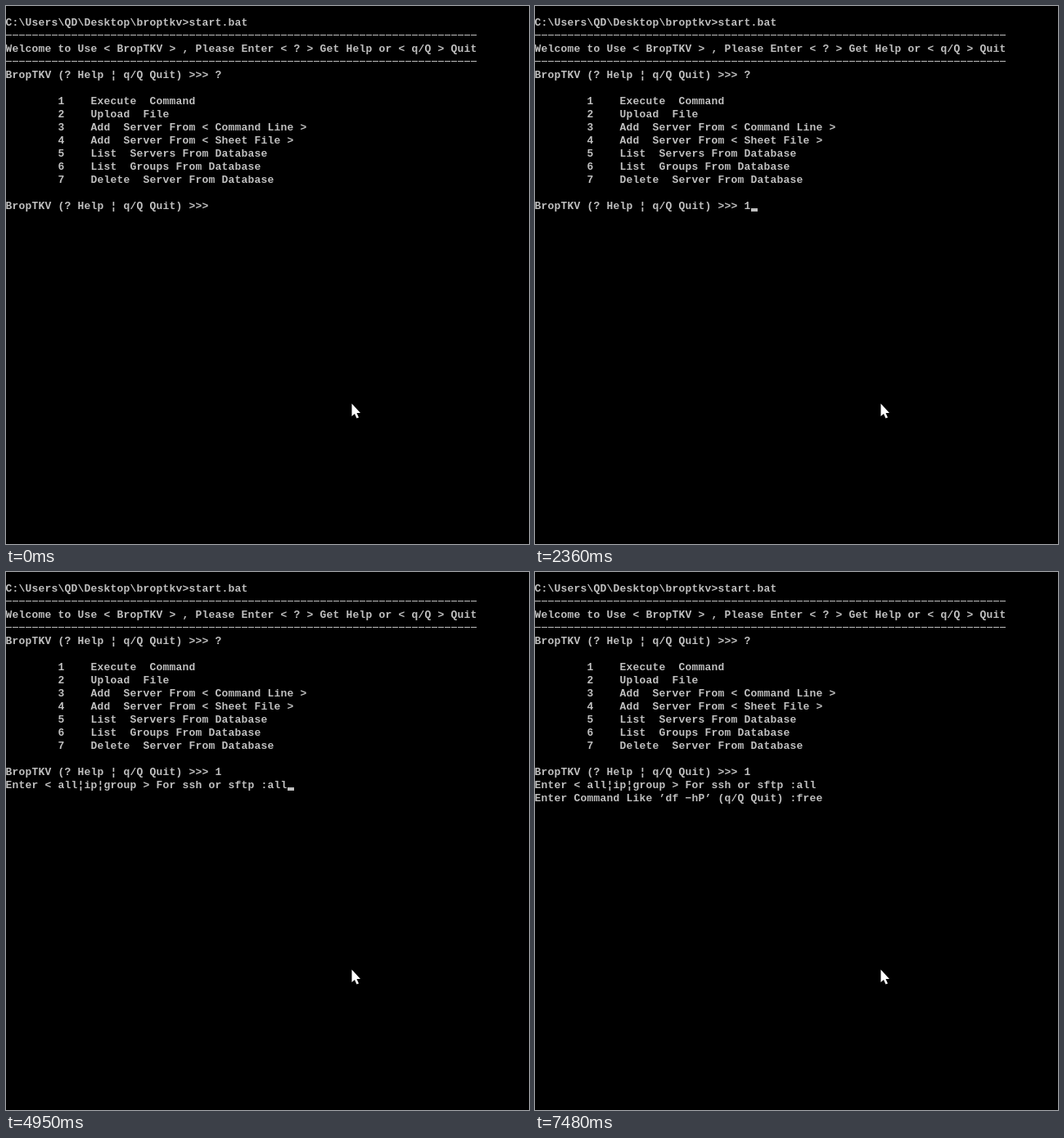
Recreate the animation shown at these times as an HTML page with a canvas. Size 639 px wide and 657 px high, loop 8000 ms.

```html
<!DOCTYPE html>
<html lang="en">
<head>
<meta charset="utf-8">
<title>Terminal session</title>
<style>
html, body { margin: 0; background: #000; overflow: hidden; }
canvas { display: block; }
</style>
</head>
<body>
<canvas id="stage" width="639" height="657"></canvas>
<script>
const ctx = document.getElementById('stage').getContext('2d');
const LOOP = 8000, CELL = 8, ROW = 16, BASELINE = 24;
const RULE = '---';
const PROMPT = 'BropTKV (? Help ¦ q/Q Quit) >>> ';

const header = [
  'C:\\Users\\QD\\Desktop\\broptkv>start.bat',
  RULE,
  'Welcome to Use < BropTKV > , Please Enter < ? > Get Help or < q/Q > Quit',
  RULE,
  PROMPT + '?',
  '',
  ...[
    'Execute  Command',
    'Upload  File',
    'Add  Server From < Command Line >',
    'Add  Server From < Sheet File >',
    'List  Servers From Database',
    'List  Groups From Database',
    'Delete  Server From Database'
  ].map((item, i) => `        ${i + 1}    ${item}`),
  '',
  PROMPT
].join('\n');

// [time in ms, text added, cursor visible]
const steps = [
  [0, '', false], [250, '', true], [680, '', false],
  [960, '1', false], [1210, '', true], [1800, '', false], [2360, '', true],
  [2630, '\nEnter < all¦ip¦group > For ssh or sftp :', false],
  [3320, '', true], [3880, '', false],
  [4150, 'a', false], [4275, 'l', false], [4400, 'l', false], [4950, '', true],
  [5260, '\nEnter Command Like ’df −hP’ (q/Q Quit) :', false],
  [6070, '', true], [6500, '', false],
  [6650, 'f', false], [7050, 'r', true], [7330, 'e', false], [7480, 'e', false]
];

const pointer = new Path2D(
  'M422.5 485.5V501L426 498L428.5 503.5L431 502.5L428.5 497H433Z');

function drawRule(y) {
  for (let col = 0; col < 72; col++) ctx.fillRect(col * CELL, y - 5, 7, 1);
}

// Glyphs sit half a pixel left so the gap falls on each cell's last column.
function drawLine(line, y) {
  [...line].forEach((char, col) => ctx.fillText(char, col * CELL + 3.5, y));
}

function draw(now) {
  const done = steps.filter(([time]) => time <= now % LOOP);
  const lines = (header + done.map(step => step[1]).join('')).split('\n');
  const cursorOn = done[done.length - 1][2];

  ctx.fillStyle = '#000';
  ctx.fillRect(0, 0, 639, 657);
  ctx.fillStyle = '#c0c0c0';
  ctx.font = 'bold 13px "Liberation Mono", monospace';
  ctx.textAlign = 'center';
  lines.forEach((line, row) => {
    const y = BASELINE + row * ROW;
    if (line === RULE) drawRule(y);
    else drawLine(line, y);
  });

  if (cursorOn) {
    const row = lines.length - 1;
    ctx.fillRect(lines[row].length * CELL, BASELINE + row * ROW - 1, CELL, 4);
  }
  ctx.fillStyle = '#fff';
  ctx.fill(pointer);
}

function tick() {
  draw(performance.now());
  requestAnimationFrame(tick);
}
tick();
</script>
</body>
</html>
```
